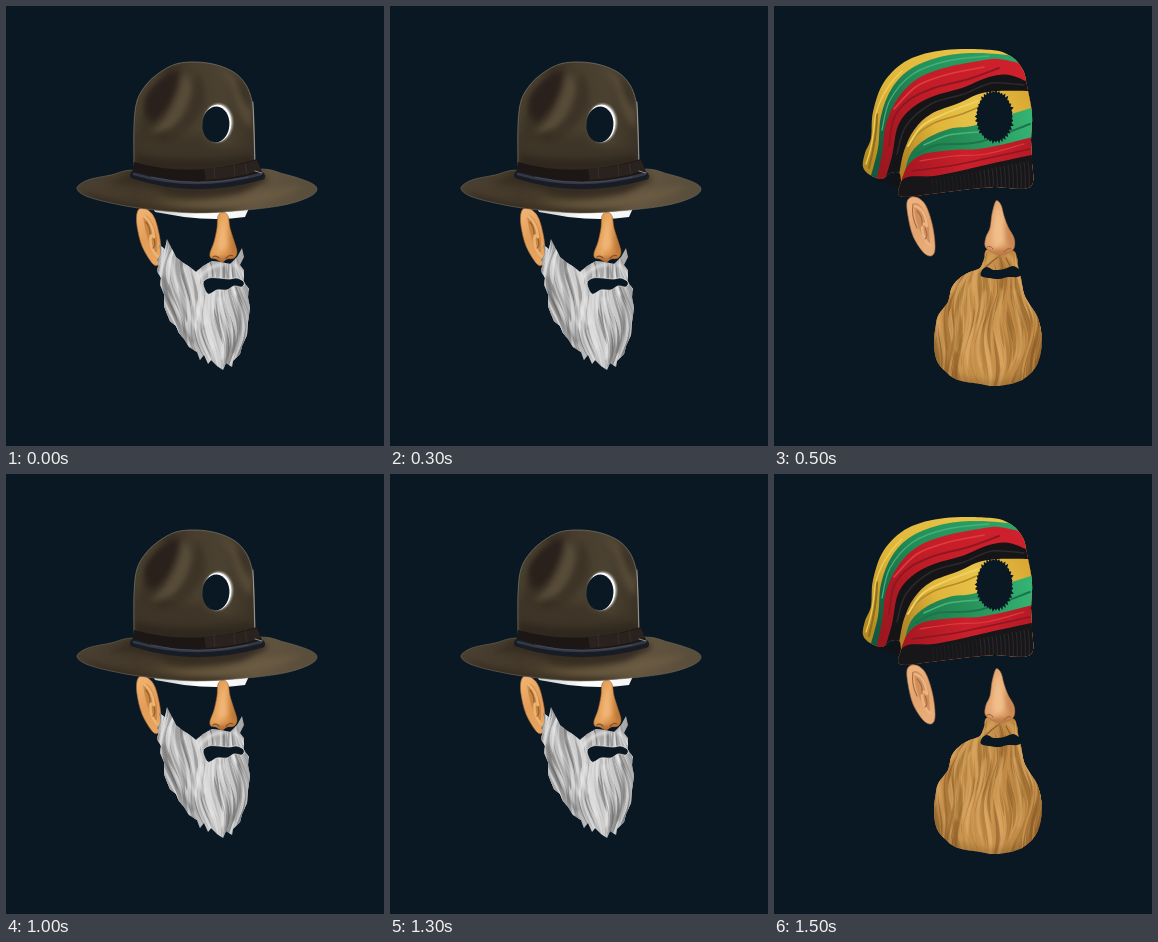
Recreate the animation shown at these times as an HTML page with a canvas. Size 378x440 px, loop 2 s.

```html
<!DOCTYPE html>
<html lang="en">
<head>
<meta charset="utf-8">
<title>Hats and beards</title>
<style>
html, body { margin: 0; width: 100%; height: 100%; overflow: hidden; background: #0a1823; }
canvas { display: block; }
</style>
</head>
<body>
<canvas id="stage" width="378" height="440"></canvas>
<script>
const ctx = document.getElementById('stage').getContext('2d');
const BG = '#0a1823';
const HOLD = 500;

function fill(shape, paint) {
  ctx.fillStyle = paint;
  ctx.fill(new Path2D(shape));
}

function line(shape, color, width = 1) {
  ctx.strokeStyle = color;
  ctx.lineWidth = width;
  ctx.lineCap = ctx.lineJoin = 'round';
  ctx.stroke(new Path2D(shape));
}

function oval(x, y, rx, ry, paint) {
  ctx.fillStyle = paint;
  ctx.beginPath();
  ctx.ellipse(x, y, rx, ry, 0.06, 0, 7);
  ctx.fill();
}

function blend(x0, y0, x1, y1, ...colors) {
  const g = ctx.createLinearGradient(x0, y0, x1, y1);
  colors.forEach((c, i) => g.addColorStop(i / (colors.length - 1), c));
  return g;
}

function inside(shape, draw) {
  ctx.save();
  ctx.clip(new Path2D(shape));
  draw();
  ctx.restore();
}

function soft(radius, draw) {
  ctx.save();
  ctx.filter = `blur(${radius}px)`;
  draw();
  ctx.restore();
}

function seeded(seed) {
  return () => (seed = (seed * 16807) % 2147483647) / 2147483647;
}

// Smooth curve through every point of a flat x, y list.
function through(coords, closed = false) {
  const n = coords.length / 2;
  const at = i => {
    const k = closed ? (i + n) % n : Math.max(0, Math.min(n - 1, i));
    return [coords[2 * k], coords[2 * k + 1]];
  };
  const path = new Path2D();
  path.moveTo(...at(0));
  for (let i = 0; i < (closed ? n : n - 1); i++) {
    const [a, b, c, d] = [at(i - 1), at(i), at(i + 1), at(i + 2)];
    path.bezierCurveTo(
      b[0] + (c[0] - a[0]) / 6, b[1] + (c[1] - a[1]) / 6,
      c[0] - (d[0] - b[0]) / 6, c[1] - (d[1] - b[1]) / 6, ...c);
  }
  return path;
}

// Wavy tapered locks fanning from a root row to a tip row.
function locks({ seed, count, root, tip, colors, width, sway }) {
  const rnd = seeded(seed);
  const at = (row, u) => [row[0] + (row[2] - row[0]) * u, row[1] + (row[3] - row[1]) * u];
  ctx.save();
  ctx.globalAlpha = 0.62;
  for (let i = 0; i < count; i++) {
    const u = rnd(), from = rnd() * 0.7 - 0.05, len = 0.25 + rnd() * 0.35;
    const [rx, ry] = at(root, u), [tx, ty] = at(tip, u);
    const bulge = Math.sin((u - 0.5) * Math.PI) * 12;
    const w = width * (0.4 + rnd());
    const left = [], right = [];
    for (let j = 0; j <= 12; j++) {
      const k = from + len * j / 12;
      const x = rx + (tx - rx) * k + bulge * Math.sin(k * Math.PI) + sway * Math.sin(k * 9 + u * 11);
      const y = ry + (ty - ry) * k;
      const half = w * Math.sin(j / 12 * Math.PI) / 2;
      left.push([x - half, y]);
      right.unshift([x + half, y]);
    }
    ctx.beginPath();
    [...left, ...right].forEach(p => ctx.lineTo(...p));
    ctx.fillStyle = colors[Math.floor(rnd() * colors.length)];
    ctx.fill();
  }
  ctx.restore();
}

function ranger() {
  // Hat lining
  fill('M147 202L243 202L239 211Q212 215 178 211L149 206Z', blend(148, 0, 242, 0, '#c9cdcd', '#fff', '#f3f4f3'));

  // Ear
  const ear = through([135, 202, 131, 207, 131, 220, 136, 240, 146, 257, 152, 259, 155, 251, 154, 233, 149, 213, 142, 204], true);
  fill(ear, blend(131, 210, 157, 250, '#efb070', '#e39d58', '#e6a561'));
  inside(ear, () => {
    fill('M137 209C143 208 149 220 151 233L151 246C146 247 139 230 137 209Z', '#c98845');
    line('M138 210Q147 217 148 231Q143 226 145 239Q148 249 153 251', '#eeb474', 2.5);
    line('M140 216Q144 221 144 228M148 233Q150 240 147 242', '#98602f', 1.3);
  });
  line(ear, '#a66b35', 0.6);

  // Beard
  const beard = 'M161 233L159 243L153 239L155 248L151 254L153 257L151 265L155 272L154 279L158 288L158 300L161 308L164 315L170 320L173 327L178 333L183 341L191 346L194 354L198 349L202 358L205 354L211 360L217 364L220 357L226 361L227 355L234 348L236 340L241 329L242 316L244 302L242 291L243 283L238 276L238 264L234 259L238 251L236 242L231 251L224 258L215 256L206 255L197 260L190 266L184 261L176 256L170 251L166 243Z';
  fill(beard, blend(153, 280, 243, 285, '#939393', '#b4b4b4', '#bdbdbd', '#a0a0a0'));
  inside(beard, () => {
    locks({ seed: 73, count: 260, root: [151, 226, 240, 254], tip: [176, 350, 242, 376],
      colors: ['#e8e8e8', '#dadada', '#cbcbcb', '#8b8b8b', '#a3a3a3', '#6a6a6a'], width: 3.4, sway: 3.5 });
    soft(1.5, () => {
      line('M164 254Q172 290 190 322M178 262Q183 288 198 318M196 292Q200 315 207 342M213 292Q222 318 216 352', 'rgba(240,240,240,.6)', 3);
      line('M157 272Q164 306 186 336M232 290Q238 318 228 346', 'rgba(80,80,80,.5)', 3);
      line('M218 258Q201 260 193 272M228 258Q235 263 237 271', 'rgba(235,235,235,.8)', 3);
    });
  });
  const mouth = through([197, 277, 203, 272, 213, 272, 223, 273, 231, 272, 238, 276, 236, 281, 228, 280, 221, 284, 211, 284, 202, 288], true);
  fill(mouth, BG);
  line(mouth, '#ededed', 0.7);

  // Nose
  const nose = through([217, 206, 222, 210, 224, 222, 228, 235, 231, 246, 228, 252, 221, 253, 216, 256, 210, 253, 205, 252, 204, 247, 208, 236, 211, 222, 212, 210], true);
  fill(nose, blend(205, 220, 231, 226, '#dc954c', '#eaa963', '#cf8641'));
  inside(nose, () => {
    soft(2, () => {
      fill('M217 210Q213 225 212 240Q217 250 221 239Q220 222 217 210Z', '#f0b577');
      fill('M205 250Q211 253 216 251Q221 253 227 249L224 260L206 258Z', '#b06c33');
      fill('M225 220L233 242L229 252Q225 242 225 220Z', '#b87335');
    });
    line('M207 251Q210 249 213 252M220 252Q224 248 227 250', '#87502a', 1.2);
  });
  line(nose, '#99602e', 0.6);

  // Brim
  const brim = through([71, 182, 82, 174, 105, 169, 130, 164, 190, 170, 252, 163, 278, 168, 303, 176, 311, 183, 303, 191, 278, 199, 240, 204, 190, 207, 140, 203, 105, 197, 80, 190], true);
  fill(brim, blend(71, 0, 311, 0, '#4a4031', '#43382a', '#54482f', '#635540', '#574d3b'));
  inside(brim, () => {
    soft(3, () => {
      fill('M102 179Q130 174 164 190Q194 195 236 187L262 174L256 167L128 165Z', '#362d22');
      fill('M146 195Q207 202 251 186L298 180Q261 199 220 202Q182 204 146 195Z', '#6b5b43');
      fill('M71 184Q96 193 142 201Q191 207 240 203L200 211L100 203Z', '#352b20');
    });
  });
  line(brim, '#6f685b', 0.6);

  // Crown
  const edge = [128, 160, 128, 120, 131, 95, 140, 79, 153, 67, 170, 58, 190, 56, 211, 59, 229, 67, 240, 79, 246, 95, 248, 115, 249, 160];
  const crown = through([...edge, 249, 172, 190, 181, 128, 172], true);
  fill(crown, blend(128, 0, 249, 0, '#40382a', '#382e23', '#493f2f', '#4b4131', '#3a3226'));
  inside(crown, () => {
    soft(3, () => {
      fill('M126 138Q133 99 151 83L162 65Q139 68 130 92Z', '#4c4330');
      fill('M138 94Q146 73 173 63Q172 96 147 116Q138 113 138 94Z', '#2a211c');
      fill('M178 66Q196 87 184 109Q171 126 143 127Q170 107 178 66Z', '#584d39');
      fill('M190 65Q203 81 197 103Q187 123 158 132Q186 108 190 65Z', '#3d3327');
      fill('M206 61Q222 66 229 93Q232 109 245 123L248 97Q238 68 206 61Z', '#584c38');
      fill('M230 71Q235 92 246 107Q247 83 230 71Z', '#342d23');
      fill('M131 128Q166 141 195 128Q198 145 242 140L248 158Q183 173 129 154Z', '#3e3528');
      fill('M129 148Q180 159 248 148L249 174L128 170Z', '#30281f');
    });
  });
  line(through(edge), '#7d776c', 0.7);
  line('M247 96L249 159', '#c6c6c1', 0.6);

  // Band and belt
  fill('M128 156Q188 173 251 153L256 166Q190 189 126 168Z', '#1c1715');
  fill('M198 163Q230 161 251 154L255 164Q232 172 200 174Z', '#2a221f');
  line('M128 169Q190 189 255 170', '#181c25', 8);
  line('M128 168Q190 186 255 168', '#343843', 2.5);
  line('M145 171Q190 182 242 171', '#4b4f59', 0.8);
  line('M208 162L209 172M228 159L229 170M239 157L241 168', '#3b2d27', 1);
  line('M249 165L256 167', '#a6a6a4', 0.8);

  // Hole
  soft(1, () => oval(212, 117, 14.5, 19, '#d9d9d4'));
  oval(211, 117.5, 14.2, 18.8, '#fff');
  oval(209.8, 118.4, 13.6, 18, BG);
}

function rasta() {
  // Knitted cap: each stripe covers the ones outside it
  const cap = through([108, 173, 96, 169, 89, 161, 91, 147, 97, 132, 99, 106, 110, 76, 134, 54, 171, 44, 218, 44, 238, 51, 249, 64, 253, 80, 258, 108, 257, 134, 258, 156, 256, 181, 220, 181, 188, 184, 156, 188, 126, 190, 127, 175, 125, 167, 116, 167], true);
  const stripe = (paint, coords) => {
    const path = through(coords);
    path.lineTo(285, 205);
    path.lineTo(122, 205);
    fill(path, paint);
  };
  fill('M97 172L112 172L126 166L135 172L134 186Q112 178 97 172Z', '#101419');
  inside(cap, () => {
    ctx.fillStyle = blend(90, 150, 180, 44, '#b38b22', '#dfb539', '#e7c244');
    ctx.fillRect(80, 35, 190, 160);
    line('M95 162Q103 130 103 108', '#8f6d20', 2);
    line('M92 158Q99 140 101 112Q106 86 128 65', '#f0cd58', 1.3);

    stripe(blend(100, 150, 240, 50, '#14583d', '#239159', '#2da468'),
      [96, 173, 104, 142, 107, 110, 118, 82, 138, 62, 170, 50, 205, 47, 242, 50]);
    line(through([108, 124, 116, 94, 139, 68, 173, 55, 215, 50]), '#45b079', 1.3);
    stripe(blend(106, 160, 250, 60, '#9b1720', '#c41d28', '#d0212d'),
      [102, 175, 108, 148, 112, 118, 124, 92, 143, 73, 170, 62, 205, 55, 225, 53, 252, 59]);
    line(through([115, 140, 120, 112, 135, 94, 160, 82, 195, 73, 225, 62]), '#8f1721', 2);
    line(through([120, 103, 143, 80, 175, 68, 210, 61]), '#df3d41', 1.6);
    stripe('#151416',
      [110, 177, 118, 150, 124, 120, 138, 102, 160, 90, 188, 82, 215, 71, 235, 69, 256, 77]);
    line(through([123, 148, 132, 120, 157, 98, 190, 88, 218, 77, 250, 79]), '#2b292b', 1.5);
    stripe(blend(128, 160, 252, 90, '#ad8324', '#dfb43a', '#e8c44a', '#d9a933'),
      [125, 169, 130, 145, 140, 124, 157, 108, 185, 97, 205, 88, 225, 85, 258, 85]);
    line(through([131, 156, 140, 132, 160, 117, 188, 108, 205, 101]), '#b48a2a', 1.5);
    line(through([134, 140, 148, 120, 170, 108, 204, 95]), '#f2d160', 1.8);
    stripe(blend(130, 150, 258, 120, '#1b7549', '#279058', '#34b373'),
      [131, 165, 137, 147, 152, 133, 175, 123, 198, 120, 225, 112, 260, 101]);
    line(through([142, 149, 163, 139, 205, 136, 256, 118]), '#1b754a', 2);
    line(through([150, 139, 175, 129, 204, 126]), '#46b67c', 1.5);
    stripe(blend(130, 165, 258, 140, '#a61721', '#cb202b', '#b81a25'),
      [128, 172, 135, 158, 150, 148, 180, 144, 205, 143, 235, 137, 262, 130]);
    line(through([138, 165, 175, 160, 210, 153, 256, 143]), '#8b1722', 1.6);
    line(through([146, 155, 180, 150, 212, 148, 250, 138]), '#dc3b3f', 1.2);
    stripe('#171618', [122, 190, 131, 172, 160, 170, 190, 164, 220, 157, 262, 148]);
    for (let x = 158; x < 258; x += 4) {
      const top = 174 - (x - 158) * 0.19;
      line(`M${x} ${top}Q${x + 2} ${top + 9} ${x + 1} 186`, x > 205 ? '#2d2a2d' : '#201f22', 1);
    }
  });

  // Ragged hole
  const rnd = seeded(41);
  ctx.beginPath();
  for (let i = 0; i < 76; i++) {
    const a = i / 76 * Math.PI * 2;
    const k = i % 2 ? 0.93 : 0.97 + rnd() * 0.12;
    ctx.lineTo(220.5 + Math.cos(a) * 18.7 * k, 110.5 + Math.sin(a) * 26 * k);
  }
  ctx.fillStyle = BG;
  ctx.fill();

  // Ear
  const ear = through([138, 191, 133, 196, 134, 210, 139, 230, 149, 246, 157, 250, 161, 243, 159, 222, 153, 202, 146, 193], true);
  fill(ear, blend(133, 205, 161, 237, '#ecb17c', '#e2a46f', '#e8ad79'));
  inside(ear, () => {
    fill('M140 197C147 196 153 207 155 222L156 237C149 235 140 216 140 197Z', '#cf8f5c');
    line('M141 200Q151 203 153 220Q146 213 149 228Q153 239 157 239', '#edb482', 2.5);
    line('M143 205Q149 210 148 220M151 222Q155 231 151 233M139 198Q137 210 143 222', '#a5683e', 1.1);
  });
  line(ear, '#ad7145', 0.6);

  // Beard
  const beard = through([214, 243, 210, 253, 206, 262, 196, 266, 187, 271, 178, 281, 174, 296, 165, 308, 162, 318, 160, 338, 163, 355, 172, 366, 184, 374, 206, 378, 218, 380, 231, 379, 248, 374, 261, 362, 267, 345, 267, 325, 263, 310, 256, 299, 250, 288, 247, 272, 244, 260, 243, 252, 238, 244], true);
  fill(beard, blend(160, 0, 267, 0, '#9d6d2f', '#c28d47', '#c9944f', '#bb8541', '#a37132'));
  inside(beard, () => {
    locks({ seed: 19, count: 280, root: [190, 250, 250, 250], tip: [160, 378, 268, 378],
      colors: ['#dcaa66', '#d3a05a', '#c8924d', '#ac7a39', '#9c6c30', '#925f2a'], width: 3.6, sway: 3.5 });
    soft(1.5, () => {
      line('M196 278Q180 310 182 345M211 286Q201 322 207 360M227 284Q222 324 228 360M240 284Q250 318 244 352', 'rgba(226,178,110,.55)', 3);
      line('M219 249Q212 257 205 264M234 249Q240 255 243 262', '#d6a15a', 3);
    });
    line('M224 251Q217 256 212 261M232 252L236 260', '#8f5f2b', 1.1);
    soft(4, () => line('M162 330Q163 363 185 374Q217 384 246 376Q268 362 268 334', 'rgba(105,66,22,.6)', 5));
  });
  fill(through([207, 270, 208, 264, 213, 261, 220, 264, 230, 263, 239, 260, 246, 264, 249, 268, 243, 271, 234, 271, 225, 273, 215, 272], true), BG);

  // Nose
  const nose = through([222, 195, 227, 199, 230, 210, 234, 221, 240, 232, 240, 242, 234, 247, 225, 249, 216, 245, 211, 240, 212, 231, 216, 222, 218, 208], true);
  fill(nose, blend(211, 220, 240, 226, '#dd9c66', '#ebb580', '#d4935a'));
  inside(nose, () => {
    soft(2, () => {
      fill('M223 199Q219 220 219 234Q225 243 230 234Q229 214 223 199Z', '#f1be8b');
      fill('M211 241Q218 245 224 243Q231 245 239 241L234 252L213 250Z', '#bd7a47');
      fill('M232 214L242 235L238 243Q232 236 232 214Z', '#c68350');
    });
    line('M213 241Q217 239 219 243M230 246Q234 241 237 243', '#9c6038', 1);
  });
  line(nose, '#aa6e42', 0.6);
}

const poses = [ranger, rasta];
let shown = -1;

function tick() {
  const index = Math.floor(performance.now() / HOLD) % poses.length;
  if (index !== shown) {
    shown = index;
    ctx.fillStyle = BG;
    ctx.fillRect(0, 0, 378, 440);
    poses[index]();
  }
  requestAnimationFrame(tick);
}

tick();
</script>
</body>
</html>
```
